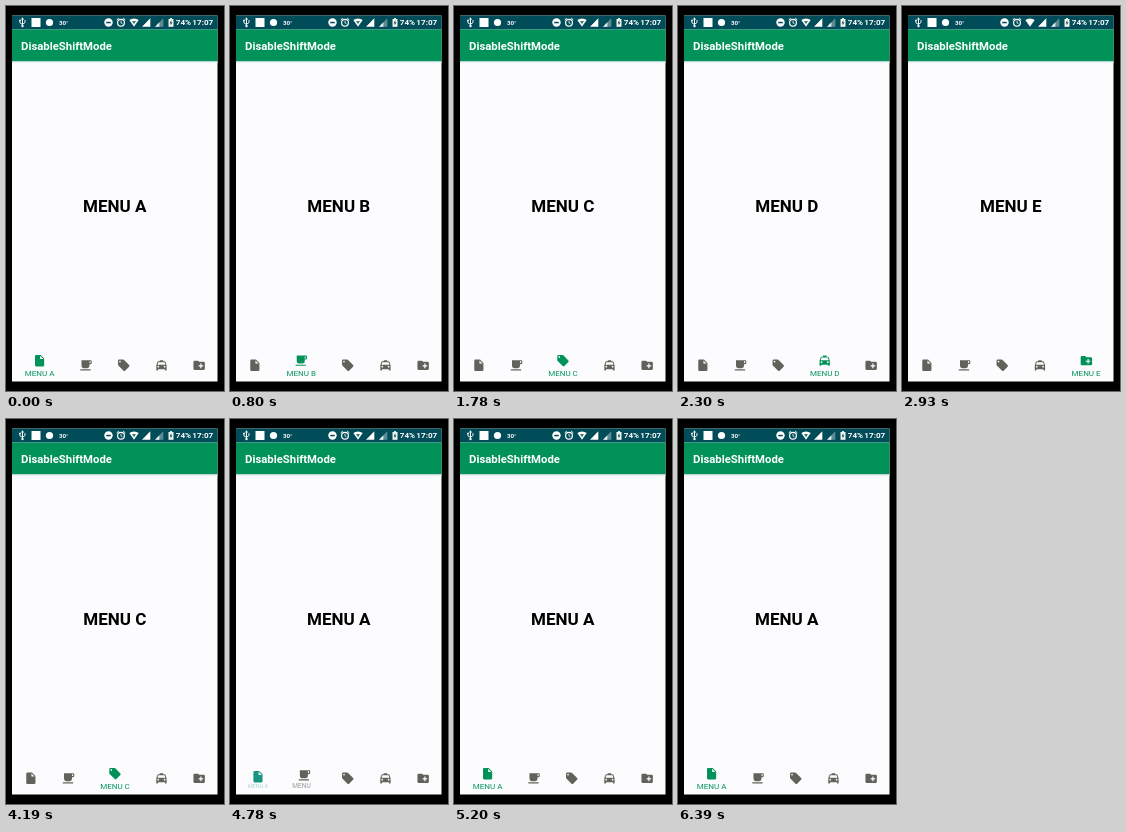
Animation of 218x385 px, one loop 6630 ms. Source, as an HTML page with a canvas:

```html
<!DOCTYPE html>
<html lang="en">
<head>
<meta charset="utf-8">
<title>Bottom navigation</title>
<style>
  html, body { margin: 0; width: 100%; height: 100%; overflow: hidden; background: #000; }
  canvas { display: block; width: 218px; height: 385px; }
</style>
</head>
<body>
<canvas id="stage"></canvas>
<script>
const W = 218, H = 385, LOOP = 6630;
const GREEN = '#009259', GREY = '#62625a', BAR = '#004c59', PAPER = '#fcfcfe';
const FONT = 'Roboto, sans-serif';
const LEFT = 6, RIGHT = 211.5, TOP = 9.5, BOTTOM = 375.5;
const NARROW = 37.7, WIDE = 55.2;
const STEP = 40, MOVE = 135;

const canvas = document.getElementById('stage');
const ctx = canvas.getContext('2d');
const dpr = window.devicePixelRatio || 1;
canvas.width = W * dpr;
canvas.height = H * dpr;

const hole = (x, y, r) => `M${x - r} ${y}a${r} ${r} 0 1 0 ${2 * r} 0a${r} ${r} 0 1 0 ${-2 * r} 0Z`;

// Icons on a 24-unit grid
const filePath = 'M6 2H14L20 8V20Q20 22 18 22H6Q4 22 4 20V4Q4 2 6 2ZM13 3.5V9H18.5Z';
const cupPath = 'M4 3H20Q22 3 22 5V8Q22 10 20 10H18V13Q18 17 14 17H8Q4 17 4 13ZM18 5V8H20V5ZM2 19H20V21H2Z';
const tagPath = 'M4 2H11Q12 2 12.6 2.6L21.4 11.6Q22.6 13 21.4 14.4L14.4 21.4Q13 22.6 11.6 21.4L2.6 12.4Q2 12 2 11V4Q2 2 4 2Z'
  + hole(5.5, 5.5, 1.5);
const taxiPath = 'M9 3H15V5H17.5Q18.6 5 19 6L21 12V20Q21 21 20 21H19Q18 21 18 20V19H6V20Q6 21 5 21H4Q3 21 3 20V12L5 6Q5.4 5 6.5 5H9ZM5 11H19L17.5 6.5H6.5Z'
  + hole(6.5, 14.5, 1.5) + hole(17.5, 14.5, 1.5);
const folderPath = 'M4 4H10L12 6H20Q22 6 22 8V18Q22 20 20 20H4Q2 20 2 18V6Q2 4 4 4ZM14 9H16V12H19V14H16V17H14V14H11V12H14Z';
const icons = [filePath, cupPath, tagPath, taxiPath, folderPath].map(d => new Path2D(d));
const names = ['MENU A', 'MENU B', 'MENU C', 'MENU D', 'MENU E'];

// Selection changes: [time in ms, item]
const taps = [[370, 1], [1210, 2], [1910, 3], [2500, 4], [3200, 3], [3665, 2], [4200, 1], [4740, 0]];

const clamp = v => Math.min(1, Math.max(0, v));
const lerp = (a, b, p) => a + (b - a) * p;

// cubic-bezier(.4, 0, .2, 1)
function ease(x) {
  if (x <= 0 || x >= 1) return clamp(x);
  let lo = 0, hi = 1;
  for (let i = 0; i < 20; i++) {
    const u = (lo + hi) / 2, v = 1 - u;
    if (1.2 * u * v * v + 0.6 * u * u * v + u * u * u < x) lo = u; else hi = u;
  }
  return lo * lo * (3 - 2 * lo);
}

function stateAt(t) {
  let from = 0, to = 0, start = -1000;
  for (const [time, item] of taps) {
    if (t < time) break;
    from = to;
    to = item;
    start = time;
  }
  const age = Math.floor((t - start) / STEP) * STEP;
  return { from, to, age, p: ease(clamp(age / MOVE)) };
}

function text(str, x, y, size, weight, color, align = 'left') {
  ctx.font = `${weight} ${size}px ${FONT}`;
  ctx.textAlign = align;
  ctx.fillStyle = color;
  ctx.fillText(str, x, y);
}

function rect(x, y, w, h, color) {
  ctx.fillStyle = color;
  ctx.fillRect(x, y, w, h);
}

function disc(x, y, r, color) {
  ctx.fillStyle = color;
  ctx.beginPath();
  ctx.arc(x, y, r, 0, 2 * Math.PI);
  ctx.fill();
}

function poly(points, color) {
  ctx.fillStyle = color;
  ctx.beginPath();
  points.forEach(([x, y]) => ctx.lineTo(x, y));
  ctx.fill();
}

function line(points, color, width) {
  ctx.strokeStyle = color;
  ctx.lineWidth = width;
  ctx.beginPath();
  points.forEach(([x, y]) => ctx.lineTo(x, y));
  ctx.stroke();
}

function drawUsb() {
  line([[16.5, 12], [16.5, 20]], '#fff', 1);
  line([[14, 14.5], [14, 17], [16.5, 18.3], [19, 16.5], [19, 14]], '#fff', 0.9);
  poly([[15, 13.5], [16.5, 11.3], [18, 13.5]], '#fff');
  disc(16.5, 20, 1.2, '#fff');
  disc(14, 14.5, 0.9, '#fff');
}

function drawAlarm(x, y) {
  ctx.strokeStyle = '#fff';
  ctx.lineWidth = 1.2;
  ctx.beginPath();
  ctx.arc(x, y, 3.4, 0, 2 * Math.PI);
  ctx.stroke();
  line([[x, y - 2], [x, y + 0.3], [x + 1.6, y + 1.2]], '#fff', 0.8);
  line([[x - 4.3, y - 2.8], [x - 2.2, y - 4.5]], '#fff', 1);
  line([[x + 4.3, y - 2.8], [x + 2.2, y - 4.5]], '#fff', 1);
}

function drawStatus(t) {
  rect(LEFT, TOP, RIGHT - LEFT, 14, BAR);
  drawUsb();
  rect(25.5, 12, 9, 9, '#fff');
  disc(43.5, 16.5, 3.6, '#fff');
  text('30°', 53, 18.8, 6.2, 700, '#fff');

  disc(102.5, 16.5, 4.2, '#fff');
  rect(100.2, 15.8, 4.6, 1.5, BAR);
  drawAlarm(115, 16.7);

  poly([[123.3, 14], [125.5, 12.9], [128, 12.6], [130.5, 12.9], [132.7, 14], [128, 20.8]], '#fff');
  const busy = t < 2440 || t >= 3180;
  if (busy) poly([[126, 15], [130, 15], [128, 18.2]], '#2f7d70');

  poly([[136, 20.7], [144.3, 20.7], [144.3, 12.3]], '#fff');
  poly([[149, 20.7], [157.3, 20.7], [157.3, 12.3]], '#5b8c95');
  poly([[149, 20.7], [153.4, 20.7], [153.4, 16.3]], '#e4eeee');

  rect(162.5, 13, 5, 7.8, '#f6f6ec');
  rect(164, 12.1, 2, 1, '#f6f6ec');
  poly([[165.4, 14.1], [163.6, 17.2], [164.8, 17.2], [164.5, 19.6], [166.4, 16.4], [165.2, 16.4]], BAR);
  text('74%', 169.8, 19.4, 8.1, 700, '#fff');
  text('17:07', 207.2, 19.4, 8.1, 700, '#fff', 'right');
}

function drawAppBar() {
  rect(LEFT, 23.5, RIGHT - LEFT, 31.5, GREEN);
  const shade = ctx.createLinearGradient(0, 55, 0, 57);
  shade.addColorStop(0, '#a9c8cc');
  shade.addColorStop(1, PAPER);
  rect(LEFT, 55, RIGHT - LEFT, 2, shade);
  text('DisableShiftMode', 15, 44, 11.35, 700, '#fff');
}

function drawIcon(i, x, y, color) {
  const k = 13.73 / 24;
  ctx.save();
  ctx.translate(x, y);
  ctx.scale(k, k);
  ctx.translate(-12, -12);
  ctx.fillStyle = color;
  ctx.fill(icons[i], 'evenodd');
  ctx.restore();
}

function drawLabel(str, x, sel, color) {
  ctx.save();
  ctx.globalAlpha = sel;
  ctx.translate(x, 366.7);
  const k = lerp(0.5, 1, sel);
  ctx.scale(k, k);
  text(str, -14.8, 2.8, 8, 400, color);
  ctx.restore();
}

// The new icon starts teal and settles into the accent green
function accent(age) {
  const p = clamp(age / 200);
  return `rgb(${lerp(30, 0, p)}, ${lerp(150, 146, p)}, ${lerp(140, 89, p)})`;
}

function drawNav({ from, to, age, p }) {
  let x = LEFT;
  names.forEach((name, i) => {
    const sel = i === to ? p : i === from ? 1 - p : 0;
    const width = lerp(NARROW, WIDE, sel);
    const mid = x + width / 2;
    const active = i === to;
    drawIcon(i, mid, lerp(359.3, 354.7, sel), active ? accent(age) : GREY);
    if (sel > 0) drawLabel(active ? name : 'MENU', mid, sel, active ? GREEN : GREY);
    x += width;
  });
}

function draw(t) {
  const state = stateAt(t);
  ctx.setTransform(dpr, 0, 0, dpr, 0, 0);
  rect(0, 0, W, H, '#000');
  rect(LEFT, TOP, RIGHT - LEFT, BOTTOM - TOP, PAPER);
  drawStatus(t);
  drawAppBar();
  const page = state.age >= STEP ? state.to : state.from;
  text(names[page], 108.8, 206.2, 17.05, 700, '#000', 'center');
  drawNav(state);
}

const begin = performance.now();
function tick() {
  draw((performance.now() - begin) % LOOP);
  requestAnimationFrame(tick);
}
tick();
</script>
</body>
</html>
```
